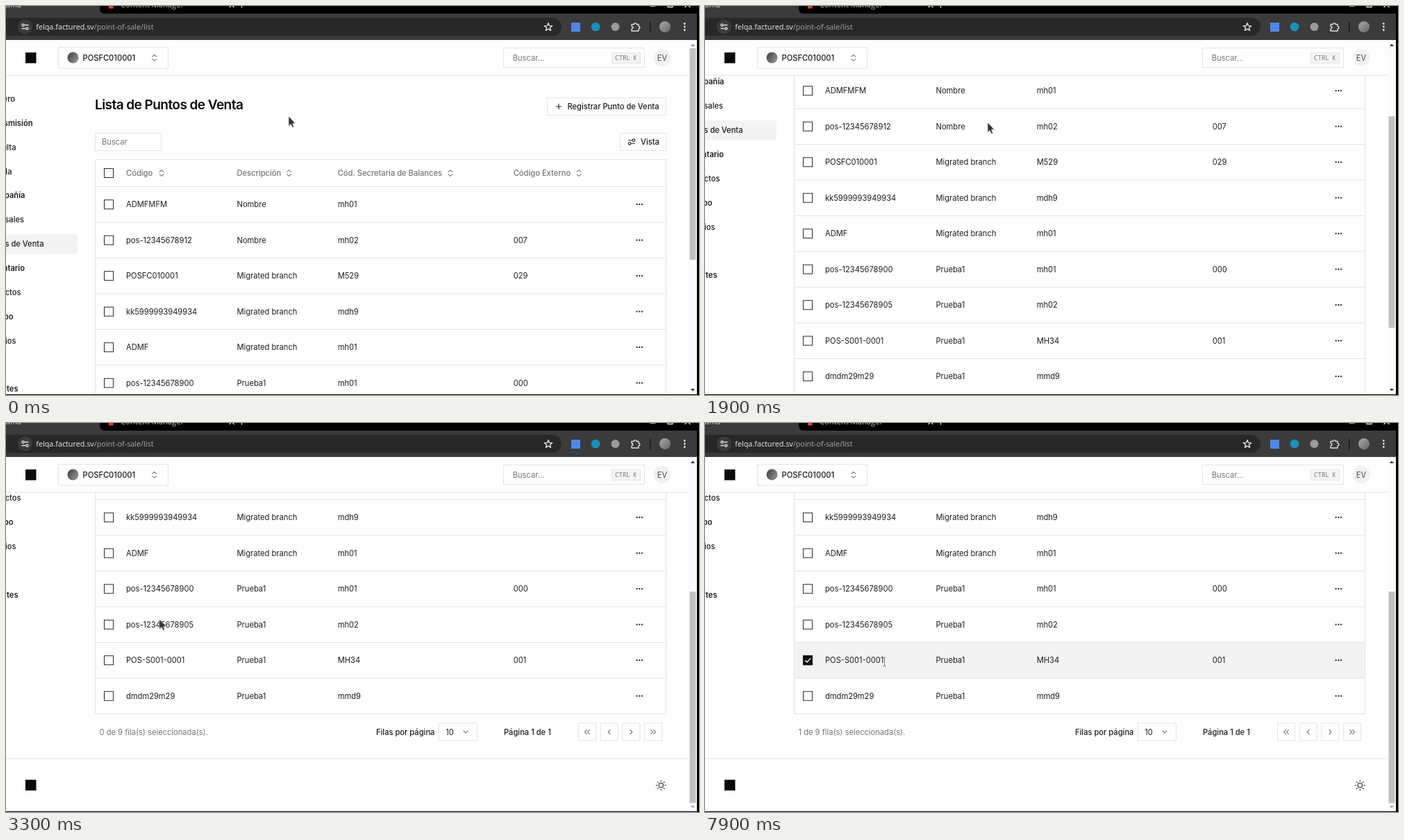
Animation, 998 px wide and 561 px high, one loop 8 s. Source, as an HTML page:

```html
<!DOCTYPE html>
<html lang="es">
<head>
<meta charset="utf-8">
<title>Lista de Puntos de Venta</title>
<style>
html, body { margin: 0; width: 100%; height: 100%; overflow: hidden; background: #fff; }
svg { display: block; width: 998px; height: 561px; }
text { font: 400 11.15px Inter, "Liberation Sans", sans-serif; font-optical-sizing: none; fill: #1c1c1f; white-space: pre; }
.m { font-weight: 500; }
.b { font-weight: 600; }
.mute { fill: #75757b; }
.title { font-size: 19.1px; font-weight: 600; letter-spacing: -.6px; fill: #0a0a0b; }
.ui { font: 10.8px "Open Sans", "Noto Sans", sans-serif; fill: #a8a8a8; }
.kbd { font: 500 9.1px "Noto Sans Mono", "DejaVu Sans Mono", monospace; fill: #77777c; }
.box { fill: #fff; stroke: #e5e5e7; }
.ico { fill: none; stroke: #222; stroke-width: 1.1; stroke-linecap: round; stroke-linejoin: round; }
.grey { stroke: #7c7c82; }
.lite { stroke: #dedede; stroke-width: 1.4; }
</style>
</head>
<body>
<svg id="stage" viewBox="0 0 998 561" xmlns="http://www.w3.org/2000/svg"></svg>
<script>
const LOOP = 8000, STEP = 100, PITCH = 51.5, TOP = 260.5, PICK = 7, CLICK = 5900;

const text = (x, y, s, cls = '', more = '') => `<text x="${x}" y="${y}" class="${cls}" ${more}>${s}</text>`;
const rect = (x, y, w, h, fill, more = '') => `<rect x="${x}" y="${y}" width="${w}" height="${h}" fill="${fill}" ${more}/>`;
const box = (x, y, w, h) => `<rect x="${x}" y="${y}" width="${w}" height="${h}" class="box"/>`;
const dot = (x, y, r, fill) => `<circle cx="${x}" cy="${y}" r="${r}" fill="${fill}"/>`;
const icon = (x, y, d, cls = '') => `<path transform="translate(${x} ${y})" d="${d}" class="ico ${cls}"/>`;
const line = (x1, y, x2) => `<path d="M${x1} ${y}H${x2}" stroke="#e3e3e6"/>`;
const sort = (x, y) => icon(x, y, 'M-3-1.6L0-4.4 3-1.6M-3 1.6L0 4.4 3 1.6', 'grey');
const check = y => rect(141.5, y - 6.5, 13, 13, '#fff', 'stroke="#2a2a2c"');

const rows = [
  ['ADMFMFM', 'Nombre', 'mh01'],
  ['pos-12345678912', 'Nombre', 'mh02', '007'],
  ['POSFC010001', 'Migrated branch', 'M529', '029'],
  ['kk5999993949934', 'Migrated branch', 'mdh9'],
  ['ADMF', 'Migrated branch', 'mh01'],
  ['pos-12345678900', 'Prueba1', 'mh01', '000'],
  ['pos-12345678905', 'Prueba1', 'mh02'],
  ['POS-S001-0001', 'Prueba1', 'MH34', '001'],
  ['dmdm29m29', 'Prueba1', 'mmd9']
];
const cols = [173, 332.5, 477.7, 730.7];
const heads = [['Código', 224], ['Descripción', 407.5], ['Cód. Secretaría de Balances', 640], ['Código Externo', 825]];

// label, right edge, slot, weight class
const menu = [
  ['Tablero', 13, 0, 'm'], ['Transmisión', 38.5, 1, 'b'], ['Consulta', 14.5, 2, 'm'], ['Anula', 8.5, 3, 'm'],
  ['Compañía', 27.5, 4, 'b'], ['Sucursales', 26, 5, 'm'], ['Puntos de Venta', 54.5, 6, 'm'],
  ['Inventario', 27, 7, 'b'], ['Productos', 21.5, 8, 'm'], ['Equipo', 10.5, 9, 'b'],
  ['Usuarios', 14.5, 10, 'm'], ['Reportes', 17.5, 12, 'b']
];

function sidebar() {
  return rect(0, 329, 103, 28.5, '#f3f3f4') + menu.map(([s, x, i, c]) =>
    text(x, 138 + i * 34.85, s, c, 'text-anchor="end"')).join('');
}

function table() {
  let s = rect(128.5, 221.5, 822, TOP + PITCH * rows.length - 221.5, '#fff', 'stroke="#e3e3e6"');
  s += `<rect id="mark" x="129" y="${TOP + PITCH * PICK}" width="821" height="${PITCH}"/>`;
  s += check(241) + heads.map(([h, x], i) => text(cols[i], 245, h, 'm mute') + sort(x, 241)).join('');
  rows.forEach((r, i) => {
    const y = TOP + PITCH * i, mid = y + 25.7;
    s += line(129, y, 950) + check(mid);
    s += r.map((c, k) => text(cols[k], mid + 4, c)).join('');
    s += [-3.7, 0, 3.7].map(d => dot(912.3 + d, mid, 1.15, '#222')).join('');
  });
  const mid = TOP + PITCH * PICK + 25.7;
  return s + `<g id="tick">${rect(141, mid - 7, 14, 14, '#111')}
    <path d="M144.3 ${mid}l2.7 2.8 5-5.6" fill="none" stroke="#fff" stroke-width="1.4"/></g>`;
}

function pager() {
  const marks = ['M-.5-3L-3.5 0-.5 3M3.5-3L.5 0 3.5 3', 'M1.5-3L-1.5 0 1.5 3', 'M-1.5-3L1.5 0-1.5 3', 'M.5-3L3.5 0 .5 3M-3.5-3L-.5 0-3.5 3'];
  return text(134.5, 754, '', 'mute', 'id="count"') +
    text(533, 754, 'Filas por página', 'm') + box(623.5, 737.5, 55, 25) + text(633.3, 754, '10') +
    icon(662, 750, 'M-3-1.5L0 1.5 3-1.5', 'grey') + text(717, 754, 'Página 1 de 1', 'm') +
    marks.map((d, i) => box(824.5 + i * 31.7, 737.5, 25, 25) + icon(837 + i * 31.7, 750, d, 'grey')).join('');
}

function footer() {
  let rays = '';
  for (let i = 0; i < 8; i++) {
    const c = Math.cos(i * Math.PI / 4), n = Math.sin(i * Math.PI / 4);
    rays += `M${(c * 5.7).toFixed(2)} ${(n * 5.7).toFixed(2)}L${(c * 7).toFixed(2)} ${(n * 7).toFixed(2)}`;
  }
  return line(0, 788.5, 983) + rect(28, 819, 15.5, 15.5, '#0a0a0a') +
    icon(943.3, 827, 'M3.2 0A3.2 3.2 0 1 1-3.2 0 3.2 3.2 0 1 1 3.2 0' + rays);
}

function page() {
  return sidebar() + text(128, 148.6, 'Lista de Puntos de Venta', 'title') +
    box(779.5, 132.5, 171, 25) + icon(796, 145, 'M-3.7 0H3.7M0-3.7V3.7') + text(808.5, 149, 'Registrar Punto de Venta', 'm') +
    box(128.5, 183.5, 95, 25) + text(138, 200.3, 'Buscar', 'mute') +
    box(884.5, 183.5, 66.5, 25) + text(914, 199.7, 'Vista', 'm') +
    icon(901, 196, 'M-4.5-2.3H1M4.7-2.3A1.8 1.8 0 1 1 1.1-2.3 1.8 1.8 0 1 1 4.7-2.3M4.5 2.3H-1M-1.1 2.3A1.8 1.8 0 1 1-4.7 2.3 1.8 1.8 0 1 1-1.1 2.3') +
    table() + pager() + footer();
}

function header() {
  return rect(0, 49, 983, 51, '#fff') + line(0, 100, 983) +
    rect(28, 67, 15.5, 15.5, '#0a0a0a') +
    box(75.5, 59.5, 158, 30.5) + dot(96.5, 74.5, 8, 'url(#ball)') + text(110.5, 78.5, 'POSFC010001', 'm') + sort(213.7, 74.7) +
    box(716.5, 60.5, 203, 28) + text(729.7, 78.5, 'Buscar...', 'mute') +
    rect(872.5, 67.5, 41, 15, '#f4f4f5', 'stroke="#e5e5e7"') + text(877, 78, 'CTRL', 'kbd') +
    text(903.5, 78, 'K', 'kbd', 'style="font-size:8px"') +
    dot(945, 74.5, 12.5, '#f1f1f2') + text(945, 78.6, 'EV', '', 'text-anchor="middle" style="fill:#4c4c50"');
}

function browser() {
  let star = '';
  for (let i = 0; i < 10; i++) {
    const r = i % 2 ? 2.6 : 6, a = i * Math.PI / 5;
    star += (i ? 'L' : 'M') + (r * Math.sin(a)).toFixed(2) + ' ' + (-r * Math.cos(a)).toFixed(2);
  }
  return rect(0, 0, 998, 49, '#000') + rect(0, 11, 995, 38, '#3b3b3b') +
    '<path d="M0 0H135V4Q135 11 142 11H0Z" fill="#3b3b3b"/>' +
    text(22, 2, 'Moluma', 'ui', 'text-anchor="end" style="fill:#ddd"') +
    rect(148, -3, 6.5, 6.5, '#e0413c') + text(165, 2, 'Content Manager', 'ui', 'style="fill:#c4c4c4;font-size:11.2px"') +
    icon(325, -1.5, 'M-3-3L3 3M3-3L-3 3', 'lite') + icon(339.5, -2, 'M-4 0H4M0-4V4', 'lite') +
    icon(931.5, 0, 'M-3.5 0H3.5', 'lite') + icon(956.5, -2, 'M-3.5-3.5H3.5V3.5H-3.5Z', 'lite') + icon(981.5, -2, 'M-3.5-3.5L3.5 3.5M3.5-3.5L-3.5 3.5', 'lite') +
    rect(-30, 17, 830, 26, '#282828', 'rx="13"') + dot(27.5, 30, 10.5, '#3b3b3b') +
    icon(27.5, 30, 'M0-2.5H4.5M-1.4-2.5A1.6 1.6 0 1 1-4.6-2.5 1.6 1.6 0 1 1-1.4-2.5M0 2.5H-4.5M4.6 2.5A1.6 1.6 0 1 1 1.4 2.5 1.6 1.6 0 1 1 4.6 2.5', 'lite') +
    text(43.3, 34, '<tspan fill="#ececec">felqa.factured.sv</tspan>/point-of-sale/list', 'ui') +
    icon(781, 30.5, star + 'Z', 'lite') +
    rect(814, 24, 13, 13, '#4f87e6') + dot(849, 30, 6.3, '#1b8fb8') + dot(877.5, 30, 6, '#9a9a9a') +
    icon(906.5, 30.5, 'M-5.5-4H-2.2A1.9 1.9 0 0 1 1.6-4H4.5V-1.2A1.8 1.8 0 0 1 4.5 2.4V5.5H-5.5V2.4A1.8 1.8 0 0 0-5.5-1.2Z', 'lite') +
    rect(927, 23, 1.5, 15, '#161616') + dot(949, 30, 8, 'url(#face)') +
    [-4.5, 0, 4.5].map(d => dot(977.3, 30 + d, 1.4, '#e0e0e0')).join('');
}

function scrollbar() {
  return rect(983, 49, 12, 511, '#fbfbfb') + '<rect id="thumb" x="984.5" width="9" height="305" fill="#c1c1c1"/>' +
    '<path id="up" d="M986 58h6l-3-3.4z"/><path id="down" d="M986 552h6l-3 3.4z"/>';
}

document.getElementById('stage').innerHTML = `
  <defs>
    <linearGradient id="ball" x2="1" y2=".6"><stop stop-color="#3d3d3d"/><stop offset="1" stop-color="#8f8f8f"/></linearGradient>
    <linearGradient id="face" x2="1" y2="1"><stop stop-color="#a9a9a9"/><stop offset="1" stop-color="#686868"/></linearGradient>
  </defs>
  ${rect(0, 0, 998, 561, '#fff')}
  <g id="page">${page()}</g>${header()}${scrollbar()}${browser()}
  ${rect(995, 0, 3, 561, '#000')}${rect(0, 560, 998, 1, '#000')}
  <path id="arrow" d="M0 0V14.2L3.2 11.4 5.5 16.3 7.7 15.2 5.5 10.5 9.4 10Z" fill="#333" stroke="#e2e2e2" stroke-width=".7"/>
  <path id="beam" d="M-2-6.5Q0-6.5 0-5V5Q0 6.5-2 6.5M2-6.5Q0-6.5 0-5M0 5Q0 6.5 2 6.5" fill="none" stroke="#777"/>`;

const el = {};
for (const id of ['page', 'mark', 'tick', 'count', 'thumb', 'up', 'down', 'arrow', 'beam']) el[id] = document.getElementById(id);

// time, scroll offset
const scroll = [[0, 0], [1400, 0], [1500, 1.6], [1600, 24], [1700, 70], [1800, 119], [1900, 164],
  [2000, 208], [2100, 250], [2200, 286], [2300, 303.6], [2400, 304.5]];
// time, x, y
const mouse = [[0, 407, 159], [800, 407, 159], [1400, 407, 168], [2900, 407, 168], [3100, 318, 226], [3300, 221, 283],
  [3700, 172, 328], [4300, 150, 349], [6900, 150, 349], [7200, 215, 345], [7500, 258.5, 344.5]];

function at(keys, t) {
  const i = keys.findIndex(k => k[0] > t);
  if (i < 0) return keys[keys.length - 1].slice(1);
  const a = keys[i - 1], b = keys[i], f = (t - a[0]) / (b[0] - a[0]);
  return a.slice(1).map((v, k) => v + (b[k + 1] - v) * f);
}

const show = (node, on) => node.setAttribute('visibility', on ? 'visible' : 'hidden');
const move = (node, x, y) => node.setAttribute('transform', `translate(${x} ${y})`);

function draw(t) {
  const [y] = at(scroll, t), [mx, my] = at(mouse, t);
  const picked = t >= CLICK, typing = picked && mx > 172;
  move(el.page, 0, -y);
  el.thumb.setAttribute('y', 61 + y * .598);
  el.up.setAttribute('fill', y < 2 ? '#8a8a8a' : '#333');
  el.down.setAttribute('fill', y > 304 ? '#a3a3a3' : '#333');
  el.mark.setAttribute('fill', picked ? '#f3f3f3' : t >= 3900 ? '#fcfcfc' : '#fff');
  show(el.tick, picked);
  el.count.textContent = (picked ? 1 : 0) + ' de 9 fila(s) seleccionada(s).';
  show(el.arrow, !typing);
  show(el.beam, typing);
  move(el.arrow, mx, my);
  move(el.beam, mx, my);
}

const start = performance.now();
function tick(now) {
  const t = Math.max(0, now - start) % LOOP;
  draw(Math.floor(t / STEP) * STEP);
  requestAnimationFrame(tick);
}
draw(0);
requestAnimationFrame(tick);
</script>
</body>
</html>
```
